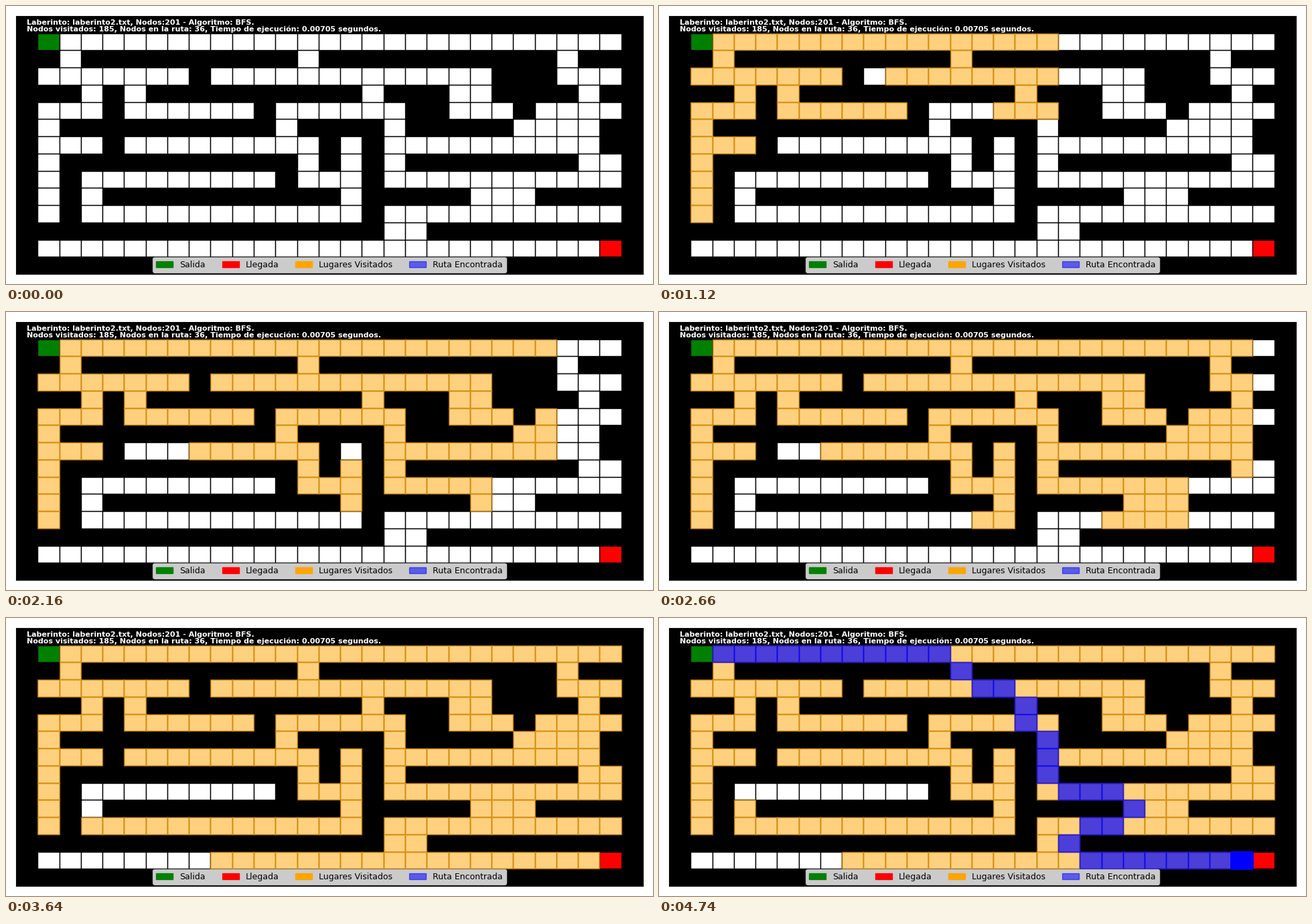
A matplotlib script for the animation above (4780 ms loop, 966 px wide and 416 px high).

```python
import matplotlib.pyplot as plt
from matplotlib.animation import FuncAnimation
from matplotlib.collections import PolyCollection
from matplotlib.patches import Patch

WIDTH, HEIGHT, DPI, PAD = 966, 416, 100, 15
COLS, ROWS = 27, 13
FRAMES, INTERVAL = 239, 20

START, GOAL = (0, 0), (12, 26)
VISITED_RGBA = (1, 165 / 255, 0, 0.5)
ROUTE_RGBA = (0, 0, 1, 0.7)
HIDDEN = (0, 0, 0, 0)

# Open columns of each maze row
CORRIDORS = [
    "0-26",
    "1 12 24",
    "0-6 8-20 24-26",
    "2 4 15 19-20 25",
    "0-2 4-9 11-16 19-21 23-26",
    "0 11 16 22-25",
    "0-2 4-12 14 16-25",
    "0 12 14 16 25-26",
    "0 2-10 12-14 16-26",
    "0 2 14 20-22",
    "0 2-14 16-26",
    "16-17",
    "0-26",
]

# Right, down, left, up, then the diagonals
MOVES = [(0, 1), (1, 0), (0, -1), (-1, 0), (1, 1), (1, -1), (-1, 1), (-1, -1)]


def open_cells():
    cells = []
    for row, line in enumerate(CORRIDORS):
        for run in line.split():
            ends = [int(col) for col in run.split("-")]
            cells += [(row, col) for col in range(ends[0], ends[-1] + 1)]
    return cells


def search(cells):
    """Breadth-first search: cells in order of discovery, and the route."""
    free = set(cells)
    parent = {START: None}
    queue = [START]
    for row, col in queue:
        if (row, col) == GOAL:
            break
        for d_row, d_col in MOVES:
            nxt = (row + d_row, col + d_col)
            if nxt in free and nxt not in parent:
                parent[nxt] = (row, col)
                queue.append(nxt)
    route, cell = [], parent[GOAL]
    while cell != START:
        route.append(cell)
        cell = parent[cell]
    return queue, route[::-1]


def square(cell):
    y, x = cell[0] + 1, cell[1] + 1
    return [(x, y), (x + 1, y), (x + 1, y + 1), (x, y + 1)]


cells = open_cells()
visited, route = search(cells)

# One patch is added per frame; the last route cell is repainted to the end
steps = visited + route
steps += [route[-1]] * (FRAMES - 1 - len(steps))
squares = [square(cell) for cell in steps]
tints = [HIDDEN if cell in (START, GOAL) else VISITED_RGBA for cell in visited]
tints += [ROUTE_RGBA] * (len(steps) - len(visited))

fig = plt.figure(figsize=(WIDTH / DPI, HEIGHT / DPI), dpi=DPI, facecolor="white")
ax = fig.add_axes([PAD / WIDTH, PAD / HEIGHT,
                   1 - 2 * PAD / WIDTH, 1 - 2 * PAD / HEIGHT])
ax.set(xlim=(0, COLS + 2), ylim=(ROWS + 2, 0), xticks=[], yticks=[],
       facecolor="black")

special = {START: "green", GOAL: "red"}
ax.add_collection(PolyCollection(
    [square(cell) for cell in cells],
    facecolors=[special.get(cell, "white") for cell in cells],
    edgecolors="black", linewidths=1), autolim=False)

trail = PolyCollection([], facecolors=tints, edgecolors=tints, linewidths=1)
ax.add_collection(trail, autolim=False)

captions = [
    (0.5, "Laberinto: laberinto2.txt, Nodos:201 - Algoritmo: BFS."),
    (0.9, "Nodos visitados: 185, Nodos en la ruta: 36, "
          "Tiempo de ejecución: 0.00705 segundos."),
]
for y, caption in captions:
    ax.text(0.5, y, caption, color="white", fontsize=8, fontweight="bold",
            family="DejaVu Sans")

ax.legend(
    handles=[
        Patch(color="green", label="Salida"),
        Patch(color="red", label="Llegada"),
        Patch(color="orange", label="Lugares Visitados"),
        Patch(color="blue", alpha=0.55, label="Ruta Encontrada"),
    ],
    loc="lower center", bbox_to_anchor=(0.5, -0.01), ncol=4,
    prop={"family": "DejaVu Sans", "size": 9})


def draw(frame):
    trail.set_verts(squares[:frame + 1])
    return [trail]


anim = FuncAnimation(fig, draw, frames=FRAMES, interval=INTERVAL,
                     repeat=True, repeat_delay=0)
plt.show()
```
